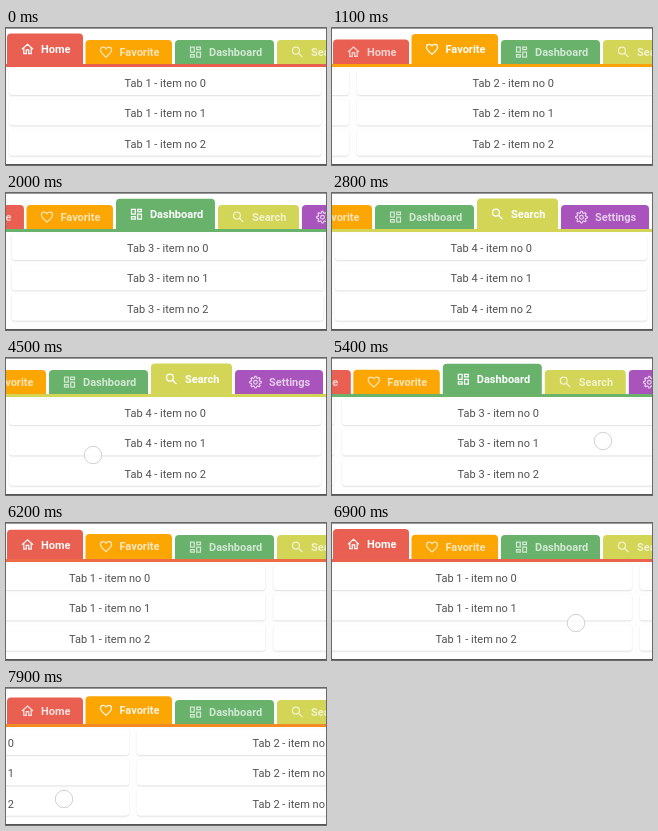
These frames come from a looping animation (320 px wide and 137 px high, 8000 ms). An HTML page with a canvas:

```html
<!DOCTYPE html>
<html lang="en">
<head>
<meta charset="utf-8">
<title>Swipeable tabs</title>
<style>
  html, body { margin: 0; width: 100%; height: 100%; overflow: hidden; background: #fff; }
  canvas { display: block; width: 320px; height: 137px; }
</style>
</head>
<body>
<canvas id="stage"></canvas>
<script>
const W = 320, H = 137, LOOP = 8000, STEP = 100;
const canvas = document.getElementById('stage');
const ctx = canvas.getContext('2d');
const dpr = window.devicePixelRatio || 1;
canvas.width = W * dpr;
canvas.height = H * dpr;

const gear = () => {
  let d = '';
  for (let i = 0; i < 32; i++) {
    const r = i % 4 < 2 ? 9.4 : 7;
    const a = (i - 0.5) * Math.PI / 16;
    d += `${i ? 'L' : 'M'}${12 + r * Math.cos(a)} ${12 + r * Math.sin(a)}`;
  }
  return d + 'ZM15 12a3 3 0 1 1-6 0a3 3 0 1 1 6 0';
};

// Icons are stroked on a 24 unit grid
const tabs = [
  { name: 'Home', x: 1, w: 76, rgb: [233, 96, 82], icon: 'M3 12L12 4L21 12M6 10V19H10V13H14V19H18V10' },
  { name: 'Favorite', x: 79.5, w: 86.5, rgb: [252, 166, 4],
    icon: 'M12 20C6 14.8 3 12 3 8.5C3 6 5 4 7.5 4C9.3 4 11 5 12 6.5C13 5 14.7 4 16.5 4C19 4 21 6 21 8.5C21 12 18 14.8 12 20Z' },
  { name: 'Dashboard', x: 169, w: 99, rgb: [104, 178, 108],
    icon: 'M4 4H10V12H4ZM14 4H20V8H14ZM14 12H20V20H14ZM4 16H10V20H4Z' },
  { name: 'Search', x: 271, w: 81, rgb: [210, 213, 86], icon: 'M15 9.5a5.5 5.5 0 1 1-11 0a5.5 5.5 0 1 1 11 0M14 14L20 20' },
  { name: 'Settings', x: 355, w: 88, rgb: [168, 84, 188], icon: gear() }
].map(tab => ({ ...tab, path: new Path2D(tab.icon) }));

const scrollStops = [0, 0, 59.5, 126, 126];

// [time, page, settle]: settle decelerates into the key
const pageKeys = [
  [0, 0], [500, 0], [900, 0.45], [1300, 1, true],
  [1500, 1], [1700, 1.5], [2100, 2, true],
  [2200, 2], [2400, 2.5], [2800, 3, true],
  [4500, 3], [4900, 2.5], [5300, 2, true],
  [5400, 1.978], [5500, 1.956], [5900, 1, true],
  [6100, 0.3], [6700, 0, true],
  [6800, 0.01], [6900, 0.047], [7900, 0.6], [8000, 0.62]
];

// [start, x, y, end, x, y]
const touches = [
  [600, 250, 98, 900, 110, 104],
  [1600, 245, 98, 1700, 125, 102],
  [2300, 245, 98, 2400, 125, 102],
  [4500, 87, 97, 4900, 247, 92],
  [5300, 264, 83, 5500, 278, 83],
  [6000, 172, 90, 6100, 284, 88],
  [6800, 256, 99, 6900, 244, 100],
  [6900, 244, 100, 7900, 58, 111]
];

const mix = (a, b, u) => a + (b - a) * u;
const easeOut = u => 1 - (1 - u) ** 3;

function pageAt(t) {
  const i = pageKeys.findIndex(key => key[0] > t);
  const [t0, p0] = pageKeys[i - 1];
  const [t1, p1, settle] = pageKeys[i];
  const u = (t - t0) / (t1 - t0);
  return mix(p0, p1, settle ? easeOut(u) : u);
}

function between(list, p, blend) {
  const i = Math.min(Math.floor(p), list.length - 2);
  return blend(list[i], list[i + 1], p - i);
}

function box(x, y, w, h, radii) {
  ctx.beginPath();
  ctx.roundRect(x, y, w, h, radii);
  ctx.fill();
}

function drawCards(page, left) {
  ctx.font = '400 11px Roboto, sans-serif';
  ctx.textAlign = 'center';
  for (let row = 0; row < 3; row++) {
    const y = 41 + row * 30.4;
    ctx.save();
    ctx.shadowColor = 'rgba(0,0,0,.15)';
    ctx.shadowBlur = 1.5 * dpr;
    ctx.shadowOffsetY = 0.8 * dpr;
    ctx.fillStyle = '#fff';
    box(left + 3, y, 312, 26, 3);
    ctx.restore();
    ctx.fillStyle = '#505050';
    ctx.fillText(`Tab ${page + 1} - item no ${row}`, left + 159.2, y + 17.8);
  }
}

function drawTab(tab, x, active) {
  const top = mix(12, 5.6, active);
  const mid = mix(24.2, 21.2, active);
  ctx.fillStyle = `rgb(${tab.rgb})`;
  box(x, top, tab.w, 37 - top, [4, 4, 0, 0]);

  const ink = `rgba(255,255,255,${mix(0.7, 1, active)})`;
  ctx.save();
  ctx.translate(x + 20.5, mid);
  ctx.scale(0.62, 0.62);
  ctx.translate(-12, -12);
  ctx.strokeStyle = ink;
  ctx.lineWidth = 2;
  ctx.stroke(tab.path);
  ctx.restore();

  ctx.font = '700 11px Roboto, sans-serif';
  ctx.textAlign = 'left';
  ctx.fillStyle = ink;
  ctx.fillText(tab.name, x + 34, mid + 3.8);
}

function drawTouch(t) {
  const touch = touches.find(k => t >= k[0] && t <= k[3]);
  if (!touch) return;
  const [t0, x0, y0, t1, x1, y1] = touch;
  const u = (t - t0) / (t1 - t0);
  ctx.beginPath();
  ctx.arc(mix(x0, x1, u), mix(y0, y1, u), 8.7, 0, Math.PI * 2);
  ctx.fillStyle = 'rgba(255,255,255,.8)';
  ctx.fill();
  ctx.strokeStyle = '#d0d0d0';
  ctx.lineWidth = 1;
  ctx.stroke();
}

function draw(t) {
  const p = pageAt(t);
  ctx.setTransform(dpr, 0, 0, dpr, 0, 0);
  ctx.fillStyle = '#fefefe';
  ctx.fillRect(0, 0, W, H);

  tabs.forEach((tab, i) => {
    if (Math.abs(i - p) < 1.1) drawCards(i, (i - p) * W);
  });

  const scroll = between(scrollStops, p, mix);
  tabs.forEach((tab, i) => drawTab(tab, tab.x - scroll, Math.max(0, 1 - Math.abs(i - p))));

  const line = between(tabs, p, (a, b, u) => a.rgb.map((c, k) => Math.round(mix(c, b.rgb[k], u))));
  ctx.fillStyle = `rgb(${line})`;
  ctx.fillRect(0, 36, W, 3);

  ctx.fillStyle = '#999';
  ctx.fillRect(0, 0, W, 1);
  ctx.fillStyle = '#555';
  ctx.fillRect(0, H - 1, W, 1);
  drawTouch(t);
}

const start = performance.now();
function tick() {
  const t = (performance.now() - start) % LOOP;
  draw(Math.floor(t / STEP) * STEP);
  requestAnimationFrame(tick);
}
tick();
</script>
</body>
</html>
```
